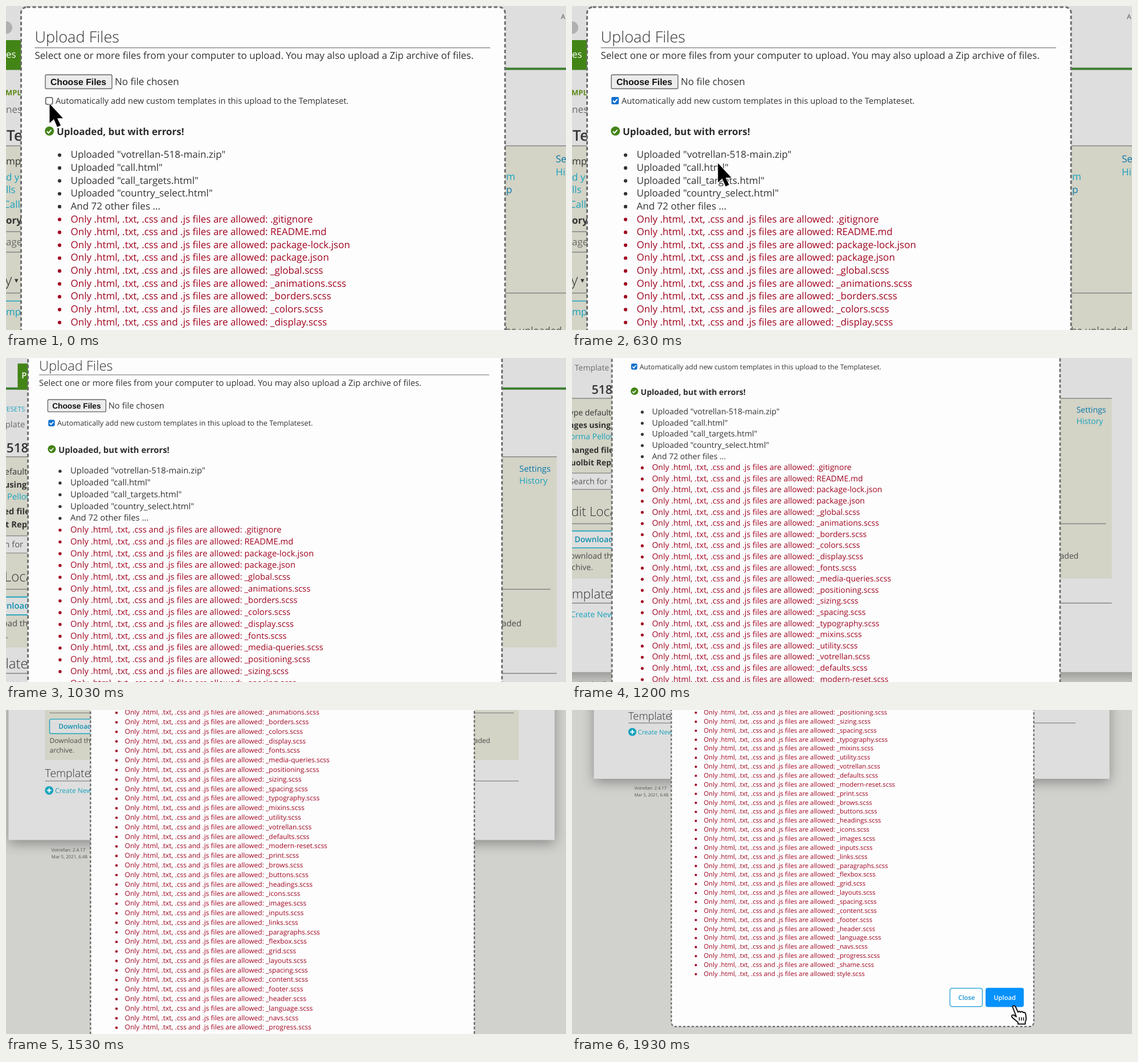
An HTML page for the animation above (1.96 s loop, 983 by 570 pixels).

```html
<!DOCTYPE html>
<html lang="en">
<head>
<meta charset="utf-8">
<title>Upload files</title>
<style>
  html, body { margin: 0; width: 100%; height: 100%; overflow: hidden; background: #d1d1ce; }
  svg { position: fixed; left: 0; top: 0; font-family: "Open Sans", "Noto Sans", sans-serif; text-rendering: geometricPrecision; }
  .card { filter: drop-shadow(0 8px 14px #0005); }
</style>
</head>
<body>
<svg id="stage" width="983" height="570" viewBox="0 0 983 570"></svg>
<script>
const LOOP = 1960, ZOOM_AT = 830, CHECK_AT = 270, HAND_AT = 1400;
const INK = "#333", RED = "#a00420", CYAN = "#18a3bd", BLUE = "#0878a8", GREEN = "#438417", GRAY = "#6c6c6c";
const WALL = "#d1d1ce", PAPER = "#dedede", PANEL = "#d3d3c6";

const rejected = (".gitignore README.md package-lock.json package.json _global _animations _borders _colors " +
  "_display _fonts _media-queries _positioning _sizing _spacing _typography _mixins _utility _votrellan " +
  "_defaults _modern-reset _print _brows _buttons _headings _icons _images _inputs _links _paragraphs " +
  "_flexbox _grid _layouts _spacing _content _footer _header _language _navs _progress _shame style.scss")
  .split(" ").map(n => n[0] === "_" ? n + ".scss" : n);
const accepted = ["votrellan-518-main.zip", "call.html", "call_targets.html", "country_select.html"];

// y is the vertical middle of the capitals
const text = (x, y, size, fill, str, weight = 400, more = "") =>
  `<text x="${x}" y="${y + size * .35}" font-size="${size}" fill="${fill}" font-weight="${weight}" ${more}>${str}</text>`;
const rect = (x, y, w, h, fill, more = "") =>
  `<rect x="${x}" y="${y}" width="${w}" height="${h}" fill="${fill}" ${more}/>`;
const line = (x1, x2, y, color = "#858585", w = 1.6) =>
  `<path d="M${x1} ${y}H${x2}" stroke="${color}" stroke-width="${w}"/>`;
const outline = (color, w, r) => `stroke="${color}" stroke-width="${w}" rx="${r}"`;
const tick = (x, y, k) =>
  `<path d="M${x - 3.8 * k} ${y}l${2.8 * k} ${3 * k} ${4.8 * k} ${-5.6 * k}" fill="none" stroke="#fff" stroke-width="${2 * k}"/>`;

function modal({ k, x, y, right }) {
  const size = 17 * k, mark = x.pick + 6.7;
  let s = rect(26.5, 2, 849.5, 1313, "#fdfdfd", outline("#6c6c6c", 3, 10) + ' stroke-dasharray="6 4"');
  s += text(x.title, y.title, 27.1 * k, INK, "Upload Files", 300);
  s += line(x.title, right, y.rule, "#8a8a8a", 1.3);
  s += text(x.title, y.intro, size, INK,
    "Select one or more files from your computer to upload. You may also upload a Zip archive of files.");
  s += rect(x.pick, y.pick - 12 * k, 117 * k, 24.5 * k, "#ececec", outline("#666", 1.4, 2));
  s += text(x.pick + 9 * k, y.pick, 15.75 * k, "#111", "Choose Files", 700, 'font-family="Liberation Sans, Arial, sans-serif"');
  s += text(x.pick + 122 * k, y.pick, size, INK, "No file chosen");
  s += `<g class="off">${rect(mark - 6, y.note - 6, 12, 12, "#fff", outline("#505050", 1.5, 2.5))}</g>`;
  s += `<g class="on">${rect(mark - 6.5 * k, y.note - 7 * k, 13 * k, 13 * k, "#1070cf", 'rx="2.5"')}${tick(mark, y.note - .5, k)}</g>`;
  s += text(x.note, y.note, 14.7 * k, INK, "Automatically add new custom templates in this upload to the Templateset.");
  s += `<circle cx="${mark + .5}" cy="${y.done - 1.5}" r="${8 * k}" fill="${GREEN}"/>` + tick(mark, y.done - 1, k);
  s += text(x.note + 2, y.done, size, "#2c2c2c", "Uploaded, but with errors!", 700);
  const rows = [
    ...accepted.map(n => [INK, `Uploaded "${n}"`]),
    [INK, "And 72 other files ..."],
    ...rejected.map(n => [RED, "Only .html, .txt, .css and .js files are allowed: " + n])
  ];
  rows.forEach(([color, str], i) => {
    const ry = y.list + i * y.step;
    s += `<circle cx="${x.bullet}" cy="${ry + 1}" r="${3.1 * k}" fill="${color}"/>` + text(x.item, ry, size, color, str);
  });
  s += rect(679.5, 1225, 76, 43, "#fff", outline("#35a7dc", 2, 5)) + text(699, 1247, 15, "#1592d2", "Close", 600);
  s += rect(763, 1224, 89.5, 45, "#0791fb", 'rx="5"') + text(782, 1247, 15, "#fff", "Upload", 600);
  return s;
}

const card = rect(-155, -400, 1208.5, 1133, PAPER, 'class="card"');

const nearPage = card +
  `<circle cx="0" cy="38" r="11" fill="#b0b0b0"/>` +
  line(0, 983, 110.5, "#3d7d30", 4) + rect(0, 60, 40, 52, GREEN) + text(0, 85, 17, "#fff", "es") +
  rect(-50, 246, 1200, 400, PANEL) +
  line(0, 983, 246) + line(0, 40, 397) + line(0, 40, 433) + line(0, 983, 505) + line(0, 40, 519, CYAN) +
  text(-1, 152, 13, "#5f8a1a", "MPL", 700) + text(0, 182, 17, GRAY, "nes") + text(1, 228, 26, INK, "Te", 600) +
  text(0, 273, 17, INK, "mp") + text(0, 301, 17, CYAN, "d y") + text(0, 323, 17, CYAN, "lls") +
  text(-4, 349, 17, CYAN, "Call,") + text(0, 377, 17, INK, "ory", 700) + text(0, 415, 17, GRAY, "age") +
  text(-2, 482, 27, INK, "y", 300) + text(15, 482, 13, INK, "▾") + text(0, 538, 17, CYAN, "mp") +
  text(974, 19, 12, "#555", "A") + text(965, 269, 17, BLUE, "Settings") + text(965, 292, 17, CYAN, "History") +
  text(878, 300, 17, CYAN, "m") + text(878, 323, 17, BLUE, "p") + text(876, 571, 17, "#555", "be uploaded");

const B = 15.13;
const farPage = card +
  line(-155, 1053, 90.5, "#3d7d30", 4) + rect(8, 45.6, 60, 47, GREEN) + text(15, 67, B, "#fff", "Pages", 600) +
  text(-63, 127, 12, CYAN, "TEMPLATESETS") + text(-44, 155, B, GRAY, "Template") + text(-12, 196.7, 23, INK, "518", 600) +
  rect(-74, 213, 1048, 342.5, PANEL) + line(-74, 974, 213) +
  text(-62, 239.6, B, INK, "Type default") + text(-64, 263.4, B, INK, "Pages using", 700) +
  text(-64, 285, B, CYAN, "Norma Pellow") + text(-64, 311, B, INK, "Changed files", 700) +
  text(-64, 335, B, INK, "Quolbit Repo", 700) +
  rect(-64, 355, 300, 31, PAPER, outline("#909090", 1.5, 4)) + text(-54, 370.5, B, "#585858", "Search for") +
  text(-64, 428.4, 24.4, INK, "Edit Locally", 300) + line(-64, 963, 451) +
  rect(-64, 465, 200, 32, PAPER, outline(CYAN, 1.8, 4)) + text(-44.3, 481, B, "#0f8fae", "Download", 600) +
  text(-64, 512, B, "#4c4c4c", "Download the template files") + text(-64, 533.5, B, "#4c4c4c", "archive.") +
  text(911, 512, B, "#4c4c4c", "uploaded", 400, 'text-anchor="end"') +
  text(-74, 585, 24.4, INK, "Templates", 300) + line(-74, 974, 602) +
  `<circle cx="-65" cy="623" r="9.5" fill="${CYAN}"/><path d="M-70 623h10M-65 618v10" stroke="#fff" stroke-width="2.4"/>` +
  text(-52, 623, B, CYAN, "Create New") +
  text(-60, 755, 10, "#505050", "Votrellan: 2.4.17") + text(-60, 770.5, 10, "#505050", "Mar 5, 2021, 6:48") +
  text(907, 234.5, B, BLUE, "Settings") + text(907, 256.3, B, CYAN, "History");

const near = {
  k: 1, right: 850,
  x: { title: 50.5, pick: 69, note: 87, bullet: 94, item: 113.5 },
  y: { title: 55, rule: 73.5, intro: 87.5, pick: 133, note: 167, done: 221.5, list: 261.3, step: 22.65 }
};
const far = {
  k: .89, right: 853,
  x: { title: 46.4, pick: 62, note: 79, bullet: 84, item: 102.5 },
  y: { title: 49.7, rule: 66, intro: 80.3, pick: 121.2, note: 153, done: 200.8, list: 238, step: 21.175 }
};

const stage = document.getElementById("stage");
stage.innerHTML = `
  ${rect(0, 0, 983, 570, WALL)}
  <g id="world">
    <g id="near">${nearPage}${modal(near)}</g>
    <g id="far">${farPage}${modal(far)}</g>
  </g>
  <g id="cursor" stroke-linejoin="round">
    <path id="arrow" d="M0 0V34L7.5 27 13.5 41 19.5 38 13.5 25.5H23.5Z" fill="#000" stroke="#fff" stroke-width="2" paint-order="stroke"/>
    <g id="hand" stroke="#111" stroke-width="2.6">
      <path d="M-1 1q3-4 7 0l6 13q3-3 6 0 4-3 6 1 5-1 6 4l1 10q0 4-2 8v5h-17v-4l-13-11q-4-4 0-6 3-1 6 2l3 2Z" fill="#fff"/>
      <path d="M15 26v8M20 26v8M25 26v8" stroke-width="2"/>
    </g>
  </g>`;

// Smooth monotone curve through [time, value] points
function curve(keys, t) {
  const last = keys.length - 1;
  if (t <= keys[0][0]) return keys[0][1];
  if (t >= keys[last][0]) return keys[last][1];
  const secant = i => (keys[i + 1][1] - keys[i][1]) / (keys[i + 1][0] - keys[i][0]);
  const slope = i => {
    if (i === 0 || i === last) return 0;
    const a = secant(i - 1), b = secant(i);
    return a * b > 0 ? 2 * a * b / (a + b) : 0;
  };
  const i = keys.findIndex(key => key[0] > t) - 1;
  const [t0, v0] = keys[i], [t1, v1] = keys[i + 1], d = t1 - t0, u = (t - t0) / d, w = 1 - u;
  return v0 * w * w * (1 + 2 * u) + v1 * u * u * (3 - 2 * u) + d * u * w * (slope(i) * w - slope(i + 1) * u);
}

const zoomKeys = [[850, 0], [1030, .081], [1330, .503], [1530, .823], [1730, .982], [1900, 1]];
const xKeys = [[300, 76.5], [630, 255.5], [900, 560], [1450, 827]];
const yKeys = [[300, 172], [630, 276], [900, 660], [1450, 1267]];

const $ = id => document.getElementById(id);
const show = (el, on) => el.setAttribute("display", on ? "inline" : "none");
const boxes = [...stage.querySelectorAll(".on, .off")];

function draw(t) {
  const p = curve(zoomKeys, t);
  const camera = `translate(${154.5 * p} ${-428 * p}) scale(${1 - .251 * p})`;
  $("world").setAttribute("transform", camera);
  $("cursor").setAttribute("transform", `${camera} translate(${curve(xKeys, t)} ${curve(yKeys, t)})`);
  show($("near"), t < ZOOM_AT);
  show($("far"), t >= ZOOM_AT);
  show($("arrow"), t < HAND_AT);
  show($("hand"), t >= HAND_AT);
  for (const box of boxes) show(box, (t >= CHECK_AT) === box.classList.contains("on"));
}

const start = performance.now();
function play() {
  draw((performance.now() - start) % LOOP);
  requestAnimationFrame(play);
}
play();
</script>
</body>
</html>
```
